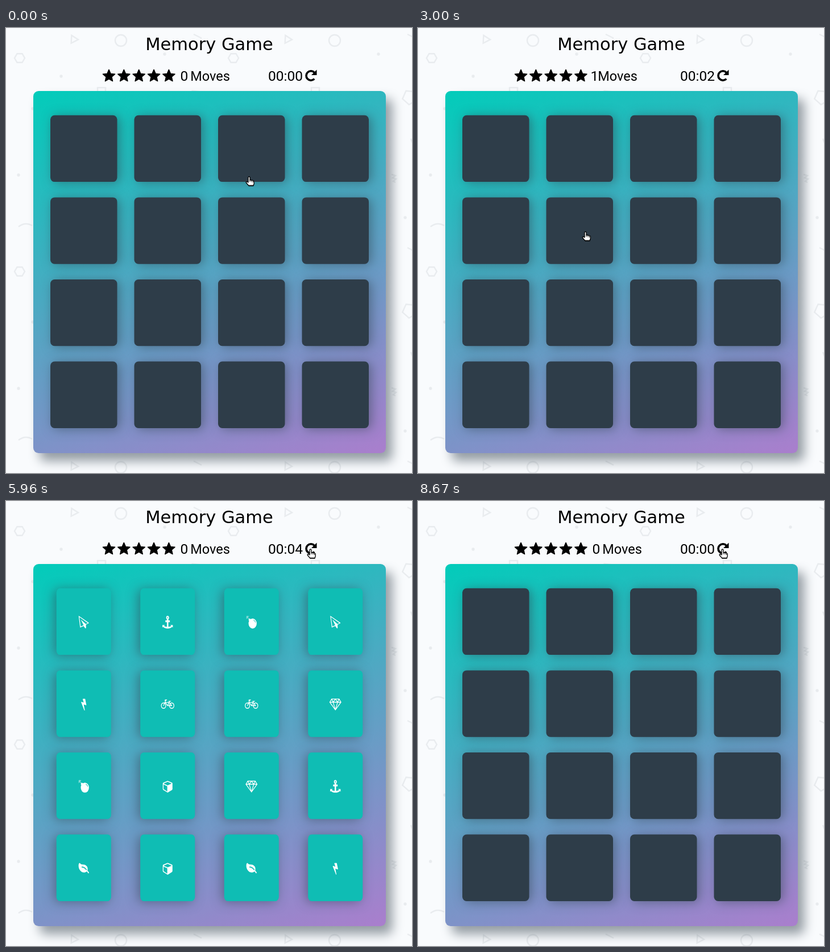
An HTML page with a canvas for the animation above (9.69 s loop, 714 by 784 pixels).

```html
<!DOCTYPE html>
<html lang="en">
<head>
<meta charset="utf-8">
<title>Memory Game</title>
<style>
  html, body { margin: 0; width: 100%; height: 100%; overflow: hidden; background: #f9fbfd; }
  canvas { display: block; width: 714px; height: 784px; }
</style>
</head>
<body>
<canvas id="stage" width="714" height="784"></canvas>
<script>
const W = 714, H = 784, LOOP = 9690, TAU = Math.PI * 2;
const ctx = document.getElementById('stage').getContext('2d');

const DARK = [46, 61, 73], TEAL = [15, 189, 180], BLUE = [57, 175, 195];
const CARD = { x: 78, y: 153.8, w: 117.5, h: 117.3, dx: 147.5, dy: 144.6, r: 7.5 };
const FLIP = 400, CLOSE = 2850, RESTART = 5760, SHUFFLE = 7690, RESET = 8670;
const TICKS = [1960, 2980, 3960, 4960];

const firstDeal = ('plane anchor bomb plane bolt bike bike gem ' +
  'bomb cube gem anchor leaf cube leaf bolt').split(' ');
const secondDeal = ('plane cube bike bolt bike bolt anchor anchor ' +
  'gem leaf gem leaf bomb cube plane bomb').split(' ');

const clamp = v => Math.max(0, Math.min(1, v));
const smooth = u => u * u * (3 - 2 * u);
const linear = u => u;
const easeOut = u => u * (2 - u);
const rgb = c => `rgb(${c.map(Math.round)})`;
const mix = (a, b, u) => a.map((v, i) => v + (b[i] - v) * u);

// cubic-bezier(.25, .1, .25, 1)
function ease(x) {
  const curve = (s, a, b) => 3 * s * (1 - s) ** 2 * a + 3 * s * s * (1 - s) * b + s ** 3;
  let lo = 0, hi = 1;
  for (let i = 0; i < 20; i++) {
    const mid = (lo + hi) / 2;
    if (curve(mid, .25, .25) < x) lo = mid; else hi = mid;
  }
  return curve(lo, .1, 1);
}

// Icons are drawn in units of 1/28 em around their centre.
const P = d => new Path2D(d);
const shapes = {
  plane: P('M27.9.4L23.7 25.8 14.4 22.6 9.7 27.7 8 27.3V19.5L.4 16.3V15.3L27 .2z' +
    'M22.2 23.6L25.7 2.9 3.3 15.8 8.5 18 22 8 14.5 20.5z'),
  anchor: P('M0 20.2H6.4L4.6 22.4C6.3 23.6 9 24 12 24.1V14H8V10H12V7H16V10H20V14H16V24.1' +
    'C19 24 21.7 23.6 23.4 22.4L21.6 20.2H28V26L26.2 24.4C23 27 19 28 14 28S5 27 1.8 24.4L0 26z'),
  bolt: P('M20.7 8.5L21 9.5 12.5 27.6Q11.2 28.2 11.1 27L14.2 14.6 7.9 16.2Q6.8 16 7 15.4' +
    'L10.2 2.5 10.8 2H16.2L16.8 2.7 14.1 10.2z'),
  cube: P('M13 1.9L25 6Q26 6.6 26 8V20L25 21.8 13 28 1 21.8 0 20V8Q0 6.6 1 6z' +
    'M14 25.5L24 20V10.1L14 13.7zM13 11.9L23.9 8 13 4 2.1 8z'),
  leaf: P('M25.3 2Q28 3 28 8C28 17 20 24 11.5 23 9 22.8 6.5 21 5.5 21 4.5 21 3 25 1.5 25' +
    ' .5 25 0 23.8 0 23.2 0 21.5 4 19.8 4 18.3 1.5 12 7 7 12 6 17 5.2 21 6 23 3.7Q24.3 2 25.3 2z'),
  vein: P('M7 17Q12 11 19 11'),
  neck: P('M15.5 8L18.8 6Q19.3 5.8 19.8 6.3L21.8 8.4Q22.2 9 21.7 9.6L20 12z'),
  fuse: P('M20 8L24 4M21.9 1L23.4 2.4M25.6 4.6L27 6M25.8 3.5H27.5M24.5.5V2M25.7 2.3L27 1'),
  bike: P('M-11 3L-4.5-4H6.5L0 3zM0 3L-5.5-6.5M-8.5-6.5H-3M2.5-9.5H6Q7.5-9.5 7-8M4.5-9.5L11 3'),
  gem: P('M-10-11.5H10L15-4.5 0 12.5-15-4.5zM-15-4.5H15M-10-11.5L-6-4.5 0 12.5 6-4.5 10-11.5' +
    'M-6-4.5L0-11.5 6-4.5')
};

function disc(c, x, y, r) {
  c.beginPath();
  c.arc(x, y, r, 0, TAU);
  c.fill();
}

function ring(c, x, y, r) {
  c.beginPath();
  c.arc(x, y, r, 0, TAU);
  c.stroke();
}

function line(path, width) {
  ctx.lineWidth = width;
  ctx.stroke(path);
}

const icons = {
  anchor() {
    ctx.fill(shapes.anchor);
    ctx.lineWidth = 2.6;
    ring(ctx, 14, 4, 2.6);
  },
  bomb(back) {
    disc(ctx, 11, 17, 11);
    ctx.fill(shapes.neck);
    line(shapes.fuse, 1);
    ctx.strokeStyle = back;
    ctx.lineWidth = 1.3;
    ctx.beginPath();
    ctx.arc(11, 17, 8, 3.5, 4.35);
    ctx.stroke();
  },
  leaf(back) {
    ctx.fill(shapes.leaf);
    ctx.strokeStyle = back;
    line(shapes.vein, 2);
  },
  bike() {
    ctx.translate(14, 14);
    ctx.lineWidth = 1.9;
    ring(ctx, -11, 3, 6);
    ring(ctx, 11, 3, 6);
    line(shapes.bike, 1.7);
  },
  gem() {
    ctx.translate(14, 14);
    line(shapes.gem, 1.8);
  },
  cube() {
    ctx.translate(1, 0);
    ctx.fill(shapes.cube, 'evenodd');
  }
};

function drawIcon(name, size, back) {
  ctx.save();
  ctx.translate(0, 1);
  ctx.scale(size / 28, size / 28);
  ctx.translate(-14, -14);
  ctx.fillStyle = ctx.strokeStyle = '#fff';
  ctx.lineCap = ctx.lineJoin = 'round';
  if (icons[name]) icons[name](back);
  else ctx.fill(shapes[name], 'evenodd');
  ctx.restore();
}

function shadow(c, x, y, blur) {
  c.shadowColor = 'rgba(46,61,73,.5)';
  c.shadowOffsetX = x;
  c.shadowOffsetY = y;
  c.shadowBlur = blur;
}

function polygon(c, x, y, r, sides, turn) {
  c.beginPath();
  for (let i = 0; i < sides; i++) {
    const a = turn + i * TAU / sides;
    c.lineTo(x + r * Math.cos(a), y + r * Math.sin(a));
  }
  c.closePath();
  c.stroke();
}

function drawTile(c) {
  c.strokeStyle = c.fillStyle = '#e9ecef';
  c.lineWidth = 2.4;
  polygon(c, 119, 20, 8, 3, 0.05);
  ring(c, 202, 22, 10);
  polygon(c, 24, 53, 9, 6, 0);
  polygon(c, 334, 122, 13, 5, -2.1);
  c.strokeRect(161, 105, 14, 14);
  for (const [x, y] of [[279, 46], [97, 85], [47, 142], [22, 259], [326, 334]]) disc(c, x, y, 2.7);
  c.stroke(P('M22 350Q34 341 46 348M330 11L344 18M336 195L340 205M302 258l7 2-5 4 6 2-5 4 4 2'));
}

// Everything that never changes: wallpaper, board and heading.
function buildScene() {
  const layer = document.createElement('canvas');
  layer.width = W;
  layer.height = H;
  const c = layer.getContext('2d');
  c.fillStyle = '#f9fbfd';
  c.fillRect(0, 0, W, H);
  for (let y = 0; y < H; y += 376) {
    for (let x = 0; x < W; x += 376) {
      c.save();
      c.translate(x, y);
      drawTile(c);
      c.restore();
    }
  }

  const sky = c.createLinearGradient(219.2, 48.7, 496.8, 811.3);
  sky.addColorStop(0, '#02ccba');
  sky.addColorStop(1, '#aa7ecd');
  c.save();
  shadow(c, 11.3, 14.1, 18.8);
  c.fillStyle = sky;
  c.beginPath();
  c.roundRect(48, 111, 620, 638, 9.4);
  c.fill();
  c.restore();

  c.fillStyle = c.strokeStyle = '#000';
  c.textAlign = 'center';
  c.font = '30.5px "DejaVu Sans", sans-serif';
  c.fillText('Memory Game', 357.5, 39);

  c.lineJoin = 'round';
  c.lineWidth = 1.4;
  for (let i = 0; i < 5; i++) {
    c.beginPath();
    for (let k = 0; k < 10; k++) {
      const r = k % 2 ? 5.2 : 11.2, a = k * TAU / 10;
      c.lineTo(181 + i * 26.35 + r * Math.sin(a), 84.6 - r * Math.cos(a));
    }
    c.closePath();
    c.fill();
    c.stroke();
  }

  c.lineWidth = 3.6;
  c.beginPath();
  c.arc(536.2, 84, 8.2, -0.75, 0.75, true);
  c.stroke();
  c.fill(P('M546.5 73.5V83H537z'));
  return layer;
}

const scene = buildScene();

function drawCard(index, name, progress) {
  const x = CARD.x + CARD.dx * (index % 4), y = CARD.y + CARD.dy * (index >> 2);
  const p = ease(progress), turn = Math.cos(Math.PI * p);
  const colour = progress < .5
    ? mix(DARK, TEAL, clamp(progress / .4))
    : mix(TEAL, BLUE, clamp((progress - .5) / .5));
  const back = rgb(colour);
  ctx.save();
  ctx.translate(x + CARD.w / 2, y + CARD.h / 2);
  ctx.scale(turn, 1);
  ctx.save();
  shadow(ctx, 4.7 * turn, 1.9, 18.8);
  ctx.fillStyle = back;
  ctx.beginPath();
  ctx.roundRect(-CARD.w / 2, -CARD.h / 2, CARD.w, CARD.h, CARD.r);
  ctx.fill();
  ctx.restore();
  if (p > 0) drawIcon(name, 31 * p ** 1.5, back);
  ctx.restore();
}

function flipProgress(index, t) {
  if (t >= RESET) return 0;
  if (t >= RESTART) return clamp((t - RESTART) / FLIP);
  if (t >= CLOSE) return 0;
  const start = { 2: 1090, 5: 2310 }[index];
  return start ? clamp((t - start) / FLIP) : 0;
}

function drawStatus(t) {
  const moves = t >= 2310 && t < RESTART ? 1 : 0;
  const seconds = t < RESET ? TICKS.filter(k => t >= k).length : 0;
  ctx.fillStyle = '#000';
  ctx.font = '24.5px Roboto, sans-serif';
  ctx.textAlign = 'left';
  ctx.fillText(moves, moves ? 303.5 : 306.5, 92.5);
  ctx.textAlign = 'right';
  ctx.fillText(`00:0${seconds}`, 522, 92.5);
  ctx.textAlign = 'left';
  ctx.font = '23.5px Roboto, sans-serif';
  ctx.fillText('Moves', moves ? 316.3 : 324.3, 92.5);
}

const track = [
  [0, 428, 262, linear], [1430, 428, 262, linear], [2000, 295, 359, smooth],
  [3960, 295, 359, linear], [4220, 448, 163, smooth], [4450, 448, 163, linear],
  [4880, 511, 98, linear], [5380, 536, 85, easeOut], [LOOP, 536, 85, linear]
];

function pointerAt(t) {
  const i = track.findIndex(k => k[0] > t);
  const [t0, x0, y0] = track[i - 1], [t1, x1, y1, move] = track[i];
  const u = move((t - t0) / (t1 - t0));
  return [x0 + (x1 - x0) * u, y0 + (y1 - y0) * u];
}

function isClickable(x, y) {
  if (x > 526 && x < 547 && y > 73 && y < 95) return true;
  const cx = x - CARD.x, cy = y - CARD.y;
  return cx >= 0 && cy >= 0 && cx % CARD.dx < CARD.w && cy % CARD.dy < CARD.h;
}

const hand = P('M-2 1.5Q-2 0-.5 0T1 1.5V6Q3 5.3 4 6.6 6 6 7 7.4 8.2 7.2 8.2 9V12L7 16H-1' +
  'L-5.5 10.8Q-6.3 9-5 8.6L-2 10z');
const knuckles = P('M1 6V9M4 7V9.5M6.5 8V10M-1 15.2H7');
const arrow = P('M0 0V16L3.7 12.5 6.4 18.4 9 17.2 6.4 11.6H11.5z');

function drawPointer(t) {
  const [x, y] = pointerAt(t);
  const overButton = isClickable(x, y);
  ctx.save();
  ctx.translate(x, y);
  ctx.fillStyle = '#fff';
  ctx.strokeStyle = '#000';
  ctx.lineJoin = 'round';
  ctx.fill(overButton ? hand : arrow);
  line(overButton ? hand : arrow, 1.3);
  if (overButton) line(knuckles, .9);
  ctx.restore();
}

function frame(now) {
  const t = now % LOOP;
  ctx.drawImage(scene, 0, 0);
  drawStatus(t);
  const deal = t >= SHUFFLE ? secondDeal : firstDeal;
  deal.forEach((name, i) => drawCard(i, name, flipProgress(i, t)));
  drawPointer(t);
  requestAnimationFrame(tick);
}

const begin = performance.now();
const tick = () => frame(performance.now() - begin);
tick();
</script>
</body>
</html>
```
